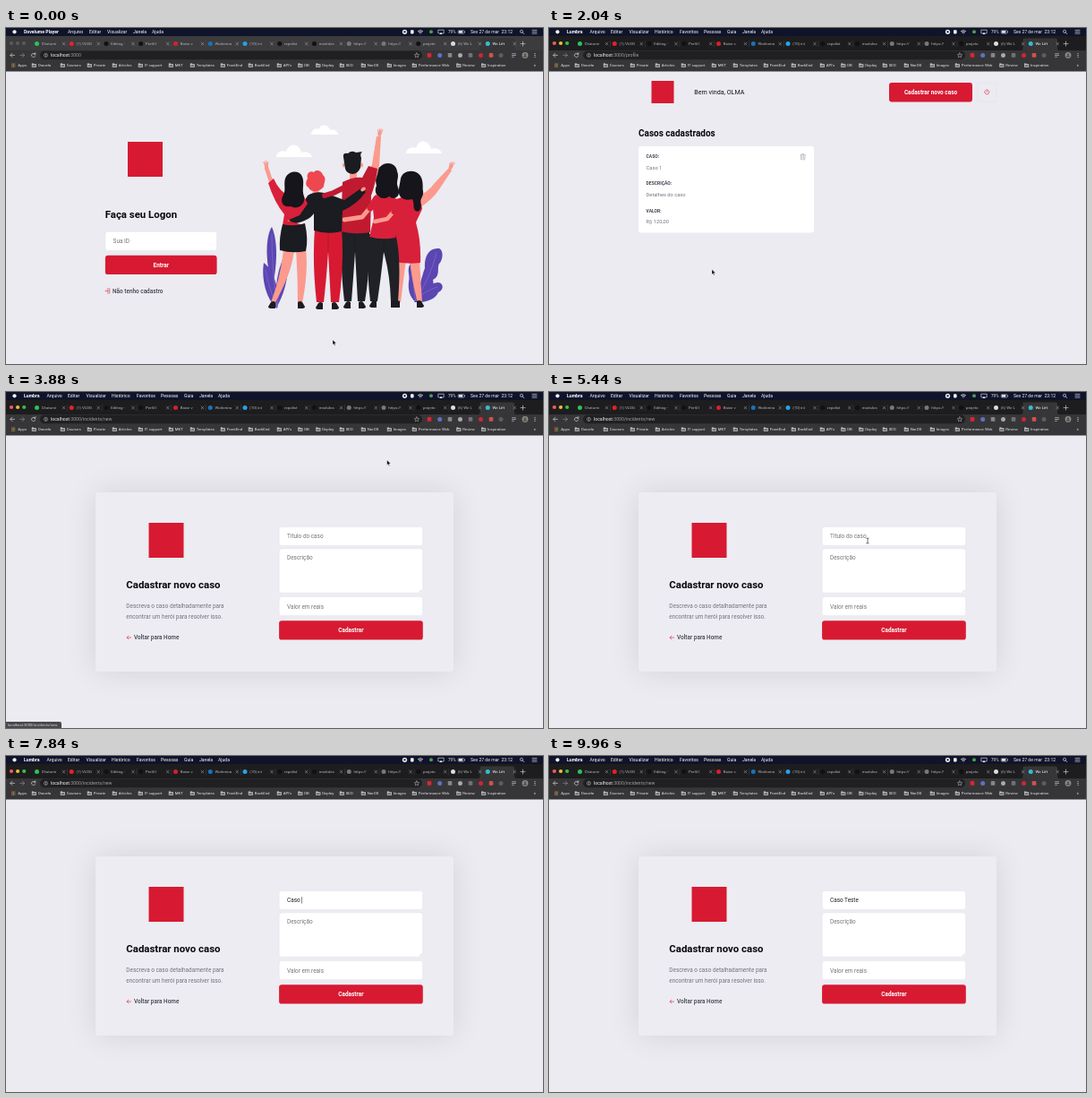
An HTML page that plays this animation: 600 by 375 pixels, repeating every 10 s.

```html
<!DOCTYPE html>
<html lang="pt">
<head>
<meta charset="utf-8">
<title>Cadastro de casos</title>
<style>
html, body { margin: 0; width: 100%; height: 100%; overflow: hidden; background: #ebebf1; }
svg { display: block; width: 600px; height: 375px; }
text { font-family: Roboto, sans-serif; white-space: pre; }
.line { fill: none; stroke-linecap: round; stroke-linejoin: round; }
</style>
</head>
<body>
<svg id="stage" viewBox="0 0 600 375" xmlns="http://www.w3.org/2000/svg"></svg>
<script>
const RED = '#d71a32', SKIN = '#fb9a8d', INK = '#1b1b22', PURPLE = '#5b46b2';
const GREY = '#737380', EDGE = '#dcdce6', DARK = '#41414d';

// Drawing helpers
const rect = (x, y, w, h, fill, r = 0, more = '') =>
  `<rect x="${x}" y="${y}" width="${w}" height="${h}" rx="${r}" fill="${fill}" ${more}/>`;
const dot = (x, y, r, fill) => `<circle cx="${x}" cy="${y}" r="${r}" fill="${fill}"/>`;
const oval = (x, y, rx, ry, fill, turn = 0) =>
  `<ellipse cx="${x}" cy="${y}" rx="${rx}" ry="${ry}" fill="${fill}" transform="rotate(${turn} ${x} ${y})"/>`;
const shape = (d, fill) => `<path d="${d}" fill="${fill}"/>`;
const line = (d, color, w = .6) => `<path class="line" d="${d}" stroke="${color}" stroke-width="${w}"/>`;
const text = (x, y, str, size, fill, weight = 400, more = '') =>
  `<text x="${x}" y="${y}" font-size="${size}" fill="${fill}" font-weight="${weight}" ${more}>${str}</text>`;
const group = (id, body) => `<g id="${id}">${body}</g>`;

const field = (x, y, w, h) => rect(x, y, w, h, '#fff', 2.9, `stroke="${EDGE}" stroke-width=".4"`);
const hint = (x, y, str, id = '') => text(x, y, str, 6.43, '#757575', 400, id && `id="${id}"`);
const button = (x, y, w, h, label) =>
  rect(x, y, w, h, RED, 2.9) + rect(x, y, w, h, '#000', 2.9, 'class="shade" opacity="0"') +
  text(x + w / 2, y + h / 2 + 2.3, label, 6.43, '#fff', 700, 'text-anchor="middle"');

// System menu bar
function menuItems(app, items) {
  return text(20, 6.1, app, 5.15, '#fff', 700) +
    items.map(([x, label]) => text(x, 6.1, label, 5.1, '#fff')).join('');
}

function menuBar() {
  const w = '#f1f1f4';
  return rect(0, 0, 600, 9, '#10142a') + dot(9.5, 4.3, 2.1, w) +
    group('menuPlayer', menuItems('Dovelume Player',
      [[69, 'Arquivo'], [93, 'Editar'], [113, 'Visualizar'], [142, 'Janela'], [163, 'Ajuda']])) +
    group('menuBrowser', rect(66.5, 0, 19.5, 8.6, '#1565f2', 0, 'id="flash"') + menuItems('Lumbra',
      [[45.5, 'Arquivo'], [69, 'Editar'], [89.5, 'Visualizar'], [118, 'Histórico'], [146, 'Favoritos'],
       [173, 'Pessoas'], [199, 'Guia'], [216, 'Janela'], [237, 'Ajuda']])) +
    dot(445.5, 4.3, 2.6, w) + rect(444.5, 3.3, 2, 2, '#10142a') +
    rect(452, 2.2, 3.6, 4.2, w, .8) +
    line('M460.4 3.5Q463 1.3 465.6 3.5M461.4 4.8Q463 3.4 464.6 4.8', w, .8) + dot(463, 6, .6, w) +
    dot(475, 4.3, 2, '#4c9c4f') +
    line('M484 5.8h-1.2V2.2h6.4v3.6H488', w, .6) + shape('M486 4.7l1.9 2.4h-3.8z', w) +
    text(494, 6.1, '79%', 4.6, w) +
    rect(505.2, 2.6, 6.8, 3.6, 'none', .7, `stroke="${w}" stroke-width=".4"`) +
    rect(505.8, 3.2, 4.5, 2.4, w) + rect(512.3, 3.6, .6, 1.6, w) +
    text(519, 6.1, 'Sex 27 de mar  23:12', 5.05, w) +
    `<circle cx="576" cy="3.8" r="1.6" fill="none" stroke="${w}" stroke-width=".6"/>` +
    line('M577.2 5l1.6 1.6', w, .7) + line('M588 2.4h5M588 4.3h5M588 6.2h5', w, .6);
}

// Browser window
function tabStrip() {
  const tabs = [['Chatumi', '#2fbf58'], ['(1) VLOG', '#e8202a'], ['Editing -', '#111'], ['Perfil I', '#111'],
    ['Baixe v', '#d6202d'], ['Workmira', '#1a72b8'], ['(10) iní', '#2c9fe8'], ['repolist', '#111'],
    ['modulos', '#111'], ['https://', '#77787a'], ['https://', '#77787a'], ['projeto', '#111'],
    ['(6) We L', '#dcdcdc'], ['We Lift', '#35bcd2']];
  const lights = ['#fc5b57', '#e5bf3c', '#38c149'];
  const close = x => line(`M${x} 16.2l2.8 2.8m0-2.8l-2.8 2.8`, '#b8b9bc', .5);
  return rect(0, 9, 600, 16, '#1d1d1f', 0, 'id="strip"') +
    shape('M528 25Q529.5 25 529.5 22V13Q529.5 11.5 531 11.5H566Q568 11.5 568 13V22Q568 25 570 25Z', '#363638') +
    group('lightsOff', [6, 13, 20].map(x => dot(x, 17, 2, '#5c5c5e')).join('')) +
    group('lightsOn', lights.map((c, i) => dot(6 + 7.1 * i, 17, 2.1, c)).join('')) +
    tabs.map(([name, color], i) => {
      const x = 34.5 + 38.75 * i, on = i === 13;
      return dot(x, 17.6, 2.5, color) + text(x + 5.2, 19.2, name, 4.4, on ? '#fff' : '#b4b5b8') +
        close(x + 28.6) + (i < 12 ? line(`M${x + 34} 14.5v6.5`, '#4c4d50', .4) : '');
    }).join('') +
    line('M575 17.6h5M577.5 15.1v5', '#c9cacc', .7);
}

function toolbar() {
  const c = '#d4d5d8';
  const icons = [[473, '#dd2530'], [484.7, '#5a73c4'], [496, '#85868a'], [507.5, '#a8a9ac'],
    [519, '#707175'], [530.5, '#cf2536'], [542, '#d5504b'], [553, '#5b5c5f']];
  return rect(0, 25, 600, 23.5, '#363638') + rect(38, 25.6, 427, 9.6, '#202022', 4.8) +
    line('M9.5 30.4H5M7 28.2l-2.2 2.2 2.2 2.2', c, .7) +
    line('M16 30.4h4.5M18.4 28.2l2.2 2.2-2.2 2.2', '#8b8c8f', .7) +
    line('M32.5 29a2.2 2.2 0 1 0 .4 2M32.9 27.6v1.7h-1.7', c, .7) +
    `<circle cx="44.5" cy="30.4" r="2" fill="none" stroke="${c}" stroke-width=".5"/>` +
    line('M44.5 30.3v1.1M44.5 29.3v.1', c, .5) +
    `<text x="50" y="32.1" font-size="5.15" fill="#f4f4f5">localhost<tspan fill="#a0a1a4">:3000<tspan id="path"></tspan></tspan></text>` +
    line('M459 27.8l.8 1.8 1.9.1-1.5 1.3.5 1.9-1.7-1.1-1.7 1.1.5-1.9-1.5-1.3 1.9-.1z', c, .45) +
    icons.map(([x, fill], i) => i % 2 ? dot(x, 30.4, 2.5, fill) : rect(x - 2.3, 28.1, 4.6, 4.6, fill, .8)).join('') +
    line('M565.5 28.7h4M565.5 30.5h4M565.5 32.3h2', c, .6) +
    dot(580, 30.4, 3.4, '#8f8b87') + dot(580, 29.5, 1.3, '#55504d') + shape('M577.6 32.6a2.4 2 0 0 1 4.8 0z', '#55504d') +
    [28.5, 30.4, 32.3].map(y => dot(591, y, .6, c)).join('');
}

function bookmarks() {
  const items = [[28, 'Oravelo'], [60, 'Courses'], [90, 'Private'], [118, 'Articles'], [147, 'IT support'],
    [181, 'MKT'], [205, 'Templates'], [239, 'FrontEnd'], [270, 'BackEnd'], [302, 'API\'s'], [325.5, 'DB'],
    [345.5, 'Deploy'], [372, 'SEO'], [396, 'NorOS'], [425, 'Images'], [453, 'Performance Web'],
    [502.5, 'Review'], [530.3, 'Inspiration']];
  let s = text(13.3, 43.2, 'Apps', 4.35, '#e6e6e8');
  for (let i = 0; i < 9; i++)
    s += rect(6 + i % 3 * 1.6, 39.5 + Math.floor(i / 3) * 1.6, 1.1, 1.1, ['#dd4b40', '#d7ae3b', '#4d9a5b'][i % 3]);
  return s + items.map(([x, name]) =>
    shape(`M${x + .8} 39.6h1.9l.7.7h2.5v3.4h-5.1z`, '#c6c7ca') + rect(x + 1.5, 41.2, 3.7, 1.8, '#6b6c6f') +
    text(x + 7.7, 43.2, name, 4.35, '#e6e6e8')).join('') + text(589.5, 43.2, '»', 5, '#e6e6e8');
}

// People seen from behind
function plants() {
  const vein = d => line(d, '#8d7fd0', .5);
  return shape('M297 222C290 232 289 262 298 288C303 264 304 238 297 222Z', PURPLE) +
    shape('M314 250C304 264 300 288 302 312C312 296 318 270 314 250Z', PURPLE) +
    shape('M288 262C285 280 291 304 303 313C307 294 299 270 288 262Z', PURPLE) +
    vein('M297 230Q297 270 303 311M290 270Q294 292 303 311M313 256Q305 284 303 311') +
    shape('M484 246C472 245 467 256 468 268C464 278 463 290 455 304C468 302 480 290 477 281C487 276 480 266 485 262C489 255 488 248 484 246Z', PURPLE) +
    shape('M452 263C447 270 452 276 450 283C449 292 451 300 457 305C466 300 465 290 462 284C466 276 460 265 452 263Z', PURPLE) +
    shape('M456 306C462 296 470 286 482 284C489 284 490 292 483 295C480 303 468 307 456 306Z', PURPLE) +
    vein('M481 251Q474 280 457 304M454 270L457 302M457 304Q468 293 482 289');
}

// Flat-bottomed cloud
function cloud(x, y, w) {
  const at = k => x + w * k;
  return shape(`M${x} ${y}C${x} ${y - 6} ${at(.18)} ${y - 8} ${at(.28)} ${y - 6}C${at(.34)} ${y - w * .4} ${at(.64)} ${y - w * .4} ${at(.7)} ${y - 5}C${at(.84)} ${y - 7} ${at(.98)} ${y - 4} ${at(1)} ${y}Z`, '#fff');
}

function hand(x, y, lean) {
  return oval(x, y, 2.1, 3, SKIN, lean) +
    [-2.2, -.7, .8, 2.2].map((k, i) => line(`M${x + k * .5} ${y}L${x + k * 1.2 + lean * .06} ${y - (i % 3 ? 5.2 : 4.3)}`, SKIN, 1.1)).join('');
}

function people() {
  const shoe = (x, y, dir = 1) => shape(`M${x} ${y}q${3 * dir} -2 ${5 * dir} 0l${3 * dir} 5q0 2 ${-4 * dir} 2h${-4 * dir}z`, INK);
  const dress = '#d9203a', top = '#c01a31', slacks = '#202027', hair = '#15151b';
  return [
    // woman in the red dress, far right
    shape('M437 258H447L441 306H435.5Q434 280 437 258Z', SKIN),
    shape('M451 258H462Q463 280 465 305H459.5Q453 280 451 258Z', SKIN),
    shoe(440, 305, -1), shoe(459, 305),
    shape('M458 189Q472 183 478 174L495 156L498 159L484 180Q476 192 463 200Z', SKIN), hand(497, 155, 25),
    shape('M436 191Q450 185 463 191L465 202L458 217Q464 238 463 262Q446 264 431 260Q433 238 437 218Z', dress),
    shape('M441 168C443 158 458 157 463 165C467 172 465 178 466 182C467 187 463 190 463 195C466 203 459 208 456 202C455 198 456 195 454 191C444 194 437 188 439 179Z', hair),
    // woman with the red top, right of centre
    shape('M406 230H435Q442 254 438 305H430Q429 274 422 250Q419 278 415 305H407Q402 262 406 230Z', slacks),
    shoe(414, 305, -1), shoe(430, 305),
    shape('M409 191Q422 184 437 191L440 205L435 234Q420 237 406 233L411 212Z', dress),
    shape('M419 154C424 149 436 150 437 160C440 167 435 171 438 178C442 188 434 193 428 188C420 194 409 186 414 176C412 168 413 158 419 154Z', hair),
    line('M438 199L426 213L412 216', SKIN, 4.5), line('M441 195L434 205', dress, 7),
    // tall man
    shape('M402 172L409 152L414 121H419L417 154Q414 172 407 182Z', SKIN), hand(417.5, 118, 12),
    shape('M375 226H406Q407 270 401 305H393L390 250Q388 280 386 305H378Q373 262 375 226Z', slacks),
    shoe(385, 306, -1), shoe(394, 306),
    line('M388 157V170', SKIN, 8),
    shape('M376 172Q388 166 398 167L405 154L415 157Q413 174 408 187L407 228Q390 231 374 227Z', top),
    oval(377.5, 153, 1.5, 2.5, SKIN), oval(397.5, 153, 1.5, 2.5, SKIN),
    shape('M377 144Q376 139 382 140Q386 136 391 139L398 138Q395 141 397 145L396 156Q393 163 387 163Q380 162 379 157Z', INK),
    line('M412 194L398 211L378 214', SKIN, 5), line('M414 190L407 201', dress, 7),
    // person in red trousers
    shape('M345 224H375Q378 262 372 306H363L360 250Q358 280 355 306H347Q342 262 345 224Z', RED),
    shoe(354, 307, -1), shoe(364, 307),
    line('M346 174V184', SKIN, 7),
    shape('M337 187Q348 180 362 186L378 192L398 178L402 183Q392 197 376 204L375 227Q360 231 344 226L344 207Q338 216 318 219L314 213Q327 206 337 187Z', INK),
    oval(399, 180, 3, 2, SKIN, -30), oval(315, 216, 3, 2, SKIN, 25),
    shape('M337 168C335 161 341 159 344 161C347 157 353 160 354 164C359 168 355 173 355 177C350 184 341 184 338 178C334 176 335 171 337 168Z', '#ee474f'),
    line('M378 178L366 184L356 187', top, 6),
    // woman with the black skirt, far left
    shape('M310 247H322Q320 272 301 306H296Q307 278 310 247Z', SKIN),
    shape('M324 247H335Q338 272 331 307H326Q326 276 324 247Z', SKIN),
    shoe(301, 306, -1), shoe(326, 306),
    line('M300 178L295 168L291 156', SKIN, 4.5), hand(291, 154, -10),
    shape('M293 173L299 168Q306 184 318 188L333 188L337 196L328 209L314 215L333 220Q320 226 309 220L311 208Q300 195 293 173Z', dress),
    shape('M309 219Q322 222 334 218Q338 236 335 249Q320 252 306 248Q305 234 309 219Z', INK),
    shape('M312 168C315 159 328 158 331 166C334 173 330 180 333 188C335 198 325 203 318 199C308 201 306 192 310 186C313 181 310 174 312 168Z', hair),
    line('M390 232V249M422 235V250M360 230V249', '#0006', .4)
  ].join('');
}

// Pages
const title = (x, y, str, size) => text(x, y, str, size, '#08080c', 700);
const body = (x, y, str) => text(x, y, str, 6.43, GREY);

const login = () =>
  rect(136, 127, 39, 39, RED) + title(110.7, 212.2, 'Faça seu Logon', 11.43) +
  field(110.9, 227.2, 124.7, 21.2) + hint(119.6, 240, 'Sua ID', 'idText') +
  button(110.9, 253.8, 124.7, 21.3, 'Entrar') +
  line('M113.6 290.9h2.2v5h-2.2M110.9 293.4h3.2M113 292l1.4 1.4-1.4 1.4', RED, .55) +
  text(119, 295.8, 'Não tenho cadastro', 6.43, DARK, 500) +
  cloud(302, 144, 40) + cloud(341, 119, 30) + cloud(447, 140, 40) + plants() + people();

function profile() {
  const rows = [['CASO:', 'Caso 1'], ['DESCRIÇÃO:', 'Detalhes do caso'], ['VALOR:', 'R$ 120,00']];
  return rect(114.5, 59, 25, 25, RED) + text(162.3, 73.8, 'Bem vinda, OLMA', 7.14, '#101014') +
    button(380, 61, 93, 21.4, 'Cadastrar novo caso') +
    rect(478.8, 61.2, 21, 21, 'none', 1.4, `stroke="${EDGE}" stroke-width=".5"`) +
    line('M487.6 69.6a2.5 2.5 0 1 0 3.4 0M489.3 68.4v2.9', RED, .6) +
    title(100, 121, 'Casos cadastrados', 10) + rect(100, 132, 196, 96.5, '#fff', 2.9) +
    rows.map(([k, v], i) => text(108.6, 145 + 30.35 * i, k, 5, DARK, 700) +
      text(108.6, 157.6 + 30.35 * i, v, 5.72, GREY)).join('') +
    line('M281 141.8h5.4M282.6 141.7v-1h2.2v1M281.5 141.9v4.9h4.4v-4.9M283 143.4v2M284.5 143.4v2', '#a0a0ab', .6);
}

const newCase = () =>
  rect(100, 112, 400, 200, '#000', 2.9, 'opacity=".1" filter="url(#blur)"') +
  rect(100, 112, 400, 200, '#edecf2', 2.9) + rect(159.5, 146, 39, 39, RED) +
  title(134.3, 219, 'Cadastrar novo caso', 11.43) +
  body(134.3, 241.3, 'Descreva o caso detalhadamente para') +
  body(134.3, 252.7, 'encontrar um herói para resolver isso.') +
  line('M139.6 274.1h-4.4M137 272.2l-1.9 1.9 1.9 1.9', RED, .6) +
  text(143, 276.4, 'Voltar para Home', 6.43, DARK, 500) +
  field(305.2, 150.4, 160.5, 21.1) + hint(314, 163.3, 'Título do caso', 'caseText') +
  field(305.2, 174.9, 160.5, 49.4) + hint(314, 187, 'Descrição') +
  line('M462 223.2l2.4-2.4M463.5 223.2l.9-.9', '#888', .3) +
  field(305.2, 228.6, 160.5, 21.1) + hint(314, 241.7, 'Valor em reais') +
  button(305.1, 255.2, 160.7, 21.4, 'Cadastrar');

const cursors =
  group('arrow', `<path d="M0 0V5.6L1.3 4.4L2.2 6.5L3.1 6.1L2.2 4.1H4Z" fill="#000" stroke="#fff" stroke-width=".4"/>`) +
  group('beam', line('M-1.2-3Q0-3 0-2.2Q0-3 1.2-3M0-2.2V2.2M-1.2 3Q0 3 0 2.2Q0 3 1.2 3', '#222', .65)) +
  group('finger', `<path d="M-.6 0Q0-.6.6 0V2.3L3 3Q3.6 4.4 2.6 6.6H-.8L-2.4 4Q-2 3-.6 4Z" fill="#fff" stroke="#000" stroke-width=".5"/>`);

document.getElementById('stage').innerHTML =
  '<defs><filter id="blur" x="-30%" y="-50%" width="160%" height="200%"><feGaussianBlur stdDeviation="17.8"/></filter></defs>' +
  rect(0, 0, 600, 375, '#ebebf1') +
  group('login', login()) + group('profile', profile()) + group('newCase', newCase()) +
  menuBar() + tabStrip() + toolbar() + bookmarks() +
  group('status', shape('M0 368H60Q62 368 62 370V375H0Z', '#48494c') +
    text(1.8, 373.2, 'localhost:3000/incidents/new', 4.2, '#d5d6d8')) +
  rect(0, 0, .5, 7.4, '#111', 0, 'id="caret"') + group('cursor', cursors);

// Timeline
const LOOP = 10000;
const ACTIVATE = 840, PASTE = 1200, FOCUS = 5640;
const pages = [
  { id: 'login', from: 0, path: '', button: [110.7, 254, 125, 21.5], input: [111, 227, 125, 21.4] },
  { id: 'profile', from: 1840, path: '/profile', button: [380, 61, 93, 21.4] },
  { id: 'newCase', from: 3680, path: '/incidents/new', button: [305, 255, 161, 21.5], input: [305, 150, 161, 21.5] }
];
const moves = [[80, 365, 348], [800, 188, 238], [1360, 188, 238], [1640, 182, 269.5], [2240, 182, 269.5],
  [3240, 425.7, 76], [4080, 425.7, 76], [5200, 356, 166], [LOOP, 356, 166]];
const phrase = 'Caso Teste';
const keys = [6700, 6900, 7120, 7320, 7560, 8200, 8440, 8660, 8860, 9100];

const el = id => document.getElementById(id);
const show = (id, on) => { el(id).style.display = on ? '' : 'none'; };
const pageAt = t => pages.filter(p => p.from <= t).pop();
const inside = (box, [x, y]) => !!box && x >= box[0] && y >= box[1] && x <= box[0] + box[2] && y <= box[1] + box[3];

function pointer(t) {
  if (t <= moves[0][0]) return moves[0].slice(1);
  const i = moves.findIndex(m => m[0] >= t);
  const [t0, x0, y0] = moves[i - 1], [t1, x1, y1] = moves[i];
  const p = (t - t0) / (t1 - t0), e = p * p * (3 - 2 * p);
  return [x0 + (x1 - x0) * e, y0 + (y1 - y0) * e];
}

// Share of the last 200 ms spent over the button
function hover(t, page) {
  const past = [0, 40, 80, 120, 160].filter(d => t - d >= page.from && inside(page.button, pointer(t - d)));
  return past.length / 5;
}

function fill(id, value, placeholder) {
  const node = el(id);
  node.textContent = value || placeholder;
  node.setAttribute('fill', value ? '#222' : '#757575');
  return value ? node.getComputedTextLength() : 0;
}

function draw(t) {
  const page = pageAt(t), pos = pointer(t), active = t >= ACTIVATE;
  pages.forEach(p => show(p.id, p === page));
  el('path').textContent = page.path;
  show('menuPlayer', !active);
  show('menuBrowser', active);
  show('lightsOff', !active);
  show('lightsOn', active);
  el('strip').setAttribute('fill', active ? '#1d1d1f' : '#3c3c3e');
  show('flash', t >= PASTE && t < PASTE + 120);
  show('status', t >= 3300 && t < 4040);

  const typed = keys.filter(k => k <= t);
  let caret = null, since = 0;
  if (page.id === 'login') {
    const w = fill('idText', t >= PASTE ? 'aa274e36' : '', 'Sua ID');
    since = t >= PASTE ? PASTE : ACTIVATE;
    caret = [119.6 + w, 233.9];
  } else if (page.id === 'newCase') {
    const w = fill('caseText', phrase.slice(0, typed.length), 'Título do caso');
    since = typed.length ? typed[typed.length - 1] : FOCUS;
    caret = [314 + w, 157.2];
  }
  show('caret', caret && t >= since && (t - since) % 1000 < 500);
  if (caret) {
    el('caret').setAttribute('x', caret[0]);
    el('caret').setAttribute('y', caret[1]);
  }

  const over = inside(page.button, pos), editing = inside(page.input, pos);
  const shade = el(page.id).querySelector('.shade');
  shade.setAttribute('opacity', .1 * hover(t, page));
  show('cursor', !typed.length);
  show('finger', over);
  show('beam', editing);
  show('arrow', !over && !editing);
  el('cursor').setAttribute('transform', `translate(${pos[0]} ${pos[1]})`);
}

function tick() {
  draw(performance.now() % LOOP);
  requestAnimationFrame(tick);
}
tick();
</script>
</body>
</html>
```
